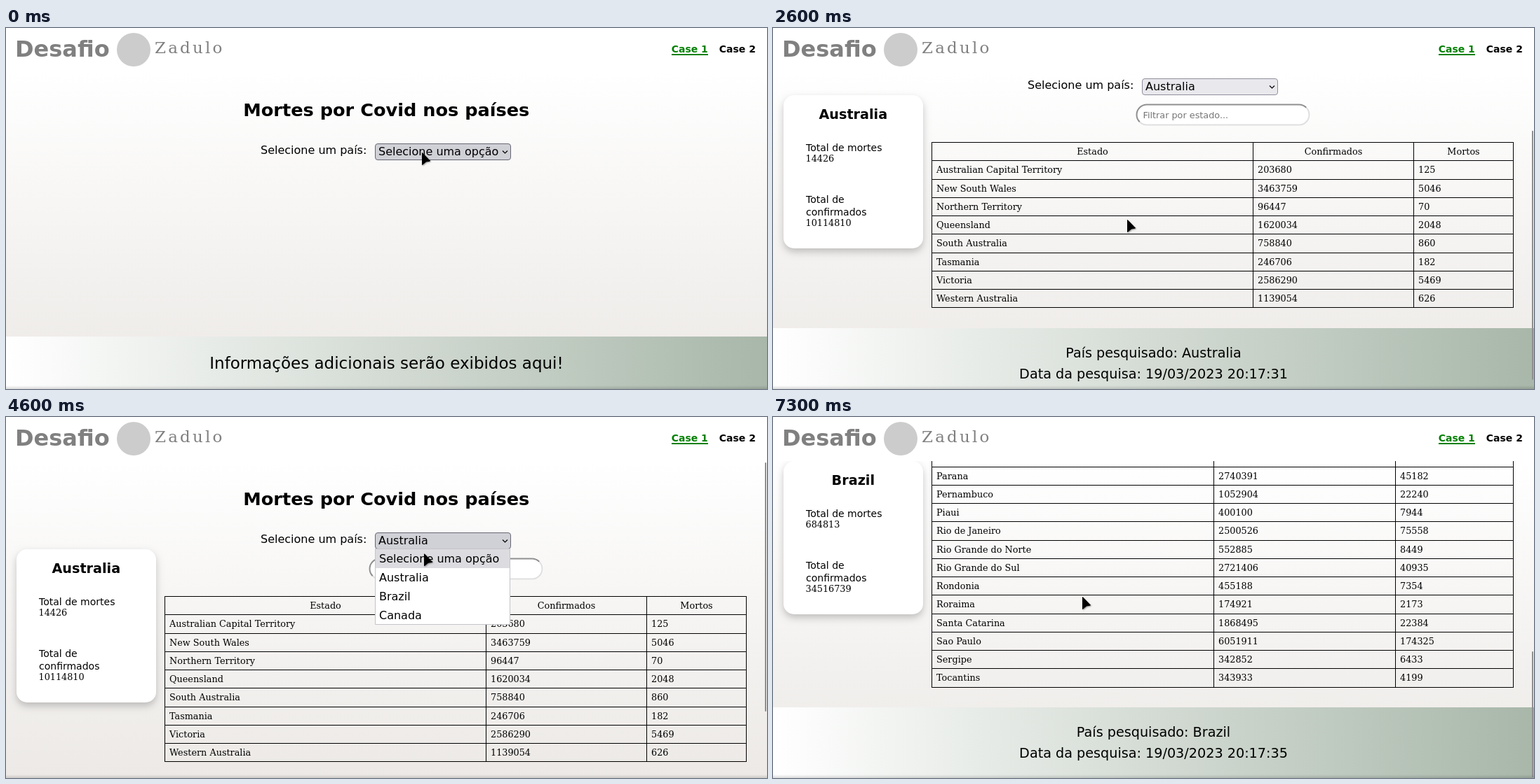
These frames come from a looping animation (1085x516 px, 8000 ms). An HTML page with a canvas:

```html
<!DOCTYPE html>
<html lang="pt-BR">
<head>
<meta charset="utf-8">
<title>Desafio</title>
<style>
html, body { margin: 0; width: 100%; height: 100%; overflow: hidden; background: #fff; }
canvas { display: block; }
</style>
</head>
<body>
<canvas id="stage" width="1085" height="516"></canvas>
<script>
const W = 1085, H = 516, TOP = 63, LOOP = 8000, STEP = 100;
const SANS = '"DejaVu Sans", sans-serif';
const SERIF = '"DejaVu Serif", serif';
const ctx = document.getElementById('stage').getContext('2d');

const OPTIONS = ['Selecione uma opção', 'Australia', 'Brazil', 'Canada'];

const parse = text => text.split(';').map(row => row.split(','));
const AUSTRALIA = {
  name: 'Australia', deaths: '14426', cases: '10114810', stamp: '19/03/2023 20:17:31',
  columns: [226, 684, 913, 1055], thumb: 356, maxScroll: 107,
  rows: parse('Australian Capital Territory,203680,125;New South Wales,3463759,5046;' +
    'Northern Territory,96447,70;Queensland,1620034,2048;South Australia,758840,860;' +
    'Tasmania,246706,182;Victoria,2586290,5469;Western Australia,1139054,626')
};
const BRAZIL = {
  name: 'Brazil', deaths: '684813', cases: '34516739', stamp: '19/03/2023 20:17:35',
  columns: [226, 628, 887, 1055], thumb: 180, maxScroll: 605.4,
  rows: parse('Acre,149378,2027;Alagoas,320552,7118;Amapa,178178,2159;Amazonas,614752,14304;' +
    'Bahia,1689830,30675;Ceara,1382048,27609;Distrito Federal,837928,11825;' +
    'Espirito Santo,1214891,14803;Goias,1685781,27505;Maranhao,469805,10988;' +
    'Mato Grosso,827903,14935;Mato Grosso do Sul,578853,10818;Minas Gerais,3874629,63659;' +
    'Para,834883,18812;Paraiba,651816,10400;Parana,2740391,45182;Pernambuco,1052904,22240;' +
    'Piaui,400100,7944;Rio de Janeiro,2500526,75558;Rio Grande do Norte,552885,8449;' +
    'Rio Grande do Sul,2721406,40935;Rondonia,455188,7354;Roraima,174921,2173;' +
    'Santa Catarina,1868495,22384;Sao Paulo,6051911,174325;Sergipe,342852,6433;' +
    'Tocantins,343933,4199')
};

// Keys are [time, ...values], linear in between.
const POINTER = [
  [0, 593, 178], [200, 593, 178], [800, 575, 222], [1100, 575, 222], [1500, 548, 240],
  [1800, 548, 240], [1900, 526, 251], [2300, 505, 274], [2600, 505, 274], [2700, 505, 277],
  [2800, 505, 278], [2900, 505, 278], [3000, 508, 281], [3100, 512, 279], [3500, 512, 279],
  [4100, 598, 178], [4500, 598, 178], [4900, 590, 247], [5000, 590, 247], [5500, 441, 257]
];
const SCROLL = [
  [2300, 0], [2400, 18], [2500, 58], [2600, 93], [2700, 107], [3200, 107], [3300, 70],
  [3400, 20], [3500, 0], [6100, 0], [6200, 50], [6300, 140], [6400, 225], [6500, 272],
  [6700, 272], [6800, 420], [6900, 544], [7000, 544], [7100, 565], [7200, 595],
  [7300, BRAZIL.maxScroll]
];

function sample(keys, t) {
  const next = keys.findIndex(key => key[0] > t);
  if (next === 0) return keys[0].slice(1);
  if (next < 0) return keys[keys.length - 1].slice(1);
  const a = keys[next - 1], b = keys[next];
  const k = (t - a[0]) / (b[0] - a[0]);
  return a.slice(1).map((v, i) => v + (b[i + 1] - v) * k);
}

function text(str, x, y, font, color = '#000', align = 'left') {
  ctx.font = font;
  ctx.fillStyle = color;
  ctx.textAlign = align;
  ctx.fillText(str, x, y);
}

function box(x, y, w, h, r, fill, stroke) {
  ctx.beginPath();
  ctx.roundRect(x, y, w, h, r);
  ctx.fillStyle = fill;
  ctx.fill();
  if (stroke) {
    ctx.strokeStyle = stroke;
    ctx.lineWidth = 1;
    ctx.stroke();
  }
}

function gradient(x0, y0, x1, y1, from, to) {
  const g = ctx.createLinearGradient(x0, y0, x1, y1);
  g.addColorStop(0, from);
  g.addColorStop(1, to);
  return g;
}

function withShadow(color, dx, dy, blur, draw) {
  ctx.save();
  ctx.shadowColor = color;
  ctx.shadowOffsetX = dx;
  ctx.shadowOffsetY = dy;
  ctx.shadowBlur = blur;
  draw();
  ctx.restore();
}

function drawHeader() {
  ctx.fillStyle = '#fff';
  ctx.fillRect(0, 0, W, TOP);
  text('Desafio', 13, 41, `bold 32px ${SANS}`, '#808080');
  ctx.beginPath();
  ctx.arc(182, 31, 24, 0, Math.PI * 2);
  ctx.fillStyle = '#ccc';
  ctx.fill();
  ctx.letterSpacing = '3.2px';
  text('Zadulo', 212, 36, `23px ${SERIF}`, '#808080');
  ctx.letterSpacing = '0px';
  text('Case 1', 948.7, 35, `bold 14px ${SANS}`, '#008000');
  ctx.fillRect(949, 37, 52, 2);
  text('Case 2', 1016.8, 35, `bold 14px ${SANS}`);
}

function drawSelect(label, y, look) {
  const [fill, stroke] = {
    idle: ['#e9e9ed', '#8f8f9d'],
    hover: ['#d0d0d7', '#676774'],
    pressed: ['#b1b1b9', '#484851']
  }[look];
  text('Selecione um país:', 363, y + 15, `16px ${SANS}`);
  box(526.5, y + 0.5, 193, 23, 3.5, fill, stroke);
  text(label, 531, y + 17, `16px ${SANS}`);
  ctx.beginPath();
  ctx.moveTo(708, y + 10.5);
  ctx.lineTo(711.5, y + 14);
  ctx.lineTo(715, y + 10.5);
  ctx.strokeStyle = '#000';
  ctx.lineWidth = 1.2;
  ctx.stroke();
}

function drawList(active) {
  box(526.5, 188.5, 192, 108, 0, '#fff', '#c4c4ca');
  OPTIONS.forEach((option, i) => {
    const y = 189 + i * 27;
    if (i === active) box(527, y, 191, 27, 0, '#dcdce0');
    text(option, 532, y + 19, `16px ${SANS}`);
  });
}

function drawFilter(y) {
  const left = 533, right = 750, mid = y + 15.5, r = 14.5, { PI } = Math;
  box(517, y, 249, 31, 15.5, '#fff');
  ctx.lineWidth = 2;
  ctx.strokeStyle = '#dfdfdf';
  ctx.beginPath();
  ctx.arc(right, mid, r, -PI / 4, PI / 2);
  ctx.arc(left, mid, r, PI / 2, PI * 0.75);
  ctx.stroke();
  ctx.strokeStyle = '#8f8f8f';
  ctx.beginPath();
  ctx.arc(left, mid, r, PI * 0.75, PI * 1.5);
  ctx.arc(right, mid, r, PI * 1.5, PI * 1.75);
  ctx.stroke();
  text('Filtrar por estado...', 527.5, y + 20, `12.8px ${SANS}`, '#757575');
}

function drawCard(data, y) {
  const label = `14px ${SANS}`, value = `12.8px ${SERIF}`;
  withShadow('rgba(0,0,0,.22)', 0, 5, 11, () => box(15, y, 199, 219, 15, '#fff'));
  text(data.name, 114.3, y + 34, `bold 19.2px ${SANS}`, '#000', 'center');
  text('Total de mortes', 47, y + 80, label);
  text(data.deaths, 46.5, y + 95, value);
  text('Total de', 47, y + 154, label);
  text('confirmados', 47, y + 171.5, label);
  text(data.cases, 46.5, y + 186.5, value);
}

function drawTable({ columns, rows }, top) {
  const font = `12.8px ${SERIF}`, pitch = 26.25, count = rows.length + 1;
  const lineY = k => Math.round(top + pitch * k);
  ctx.fillStyle = '#000';
  for (let k = 0; k <= count; k++) ctx.fillRect(226, lineY(k), 830, 1);
  columns.forEach(x => ctx.fillRect(x, lineY(0), 1, lineY(count) - lineY(0) + 1));
  ['Estado', 'Confirmados', 'Mortos'].forEach((name, c) =>
    text(name, (columns[c] + columns[c + 1] + 1) / 2, lineY(0) + 18, font, '#000', 'center'));
  rows.forEach((row, r) => row.forEach((cell, c) =>
    text(cell, columns[c] + 7, lineY(r + 1) + 18, font)));
  return top + pitch * count;
}

function drawFooter(y, data) {
  ctx.fillStyle = gradient(0, 0, W, 0, '#fff', '#a8b7a9');
  ctx.fillRect(0, y, W, data ? 101 : 75);
  if (data) {
    const font = `19.2px ${SANS}`;
    text(`País pesquisado: ${data.name}`, 542.5, y + 42, font, '#000', 'center');
    text(`Data da pesquisa: ${data.stamp}`, 542.5, y + 72, font, '#000', 'center');
  } else {
    text('Informações adicionais serão exibidos aqui!', 542.5, y + 46, `23px ${SANS}`, '#000', 'center');
  }
}

function drawScrollbar({ thumb, maxScroll }, scroll) {
  const y = 65 + scroll / maxScroll * (450 - thumb);
  box(1082, y, 2, thumb, 1, '#8f8f8f');
}

function drawPointer(x, y) {
  withShadow('rgba(0,0,0,.35)', 1, 1, 2, () => {
    ctx.beginPath();
    ctx.moveTo(x + 0.5, y + 0.5);
    ctx.lineTo(x + 11.5, y + 12);
    ctx.lineTo(x + 6, y + 13);
    ctx.lineTo(x + 0.5, y + 17.5);
    ctx.closePath();
    ctx.fillStyle = ctx.strokeStyle = '#000';
    ctx.lineJoin = 'round';
    ctx.lineWidth = 1;
    ctx.fill();
    ctx.stroke();
  });
}

function render(t) {
  const [px, py] = sample(POINTER, t);
  const [scroll] = sample(SCROLL, t);
  const data = t < 2000 ? null : t < 5300 ? AUSTRALIA : BRAZIL;
  const chosen = t < 1500 ? 0 : t < 5100 ? 1 : 2;
  const open = (t >= 200 && t < 1500) || (t >= 4300 && t < 5100);
  const pressed = t === 100 || t === 4200;
  const selectY = 165 - scroll;
  const over = px >= 526 && px <= 720 && py >= selectY && py <= selectY + 24;

  ctx.fillStyle = gradient(0, TOP, 0, H, '#fff', '#ece9e6');
  ctx.fillRect(0, 0, W, H);

  ctx.save();
  ctx.beginPath();
  ctx.rect(0, TOP, W, H - TOP);
  ctx.clip();
  text('Mortes por Covid nos países', 542.3, 126 - scroll, `bold 25.6px ${SANS}`, '#000', 'center');
  drawSelect(OPTIONS[chosen], selectY, pressed ? 'pressed' : over || open ? 'hover' : 'idle');
  if (data) {
    drawFilter(201.5 - scroll);
    drawCard(data, Math.max(TOP, 189 - scroll));
    const bottom = drawTable(data, 256 - scroll);
    drawFooter(Math.round(bottom + 29.6), data);
    drawScrollbar(data, scroll);
  } else {
    drawFooter(441, null);
  }
  ctx.fillStyle = gradient(0, 511, 0, H, 'rgba(0,0,0,0)', 'rgba(0,0,0,.14)');
  ctx.fillRect(0, 511, W, 5);
  ctx.restore();

  drawHeader();
  if (open) drawList(py > 189 ? Math.min(3, Math.floor((py - 189) / 27)) : chosen);
  drawPointer(px, py);
}

const start = performance.now();
function tick() {
  const t = (performance.now() - start) % LOOP;
  render(Math.floor(t / STEP) * STEP);
  requestAnimationFrame(tick);
}
tick();
</script>
</body>
</html>
```
